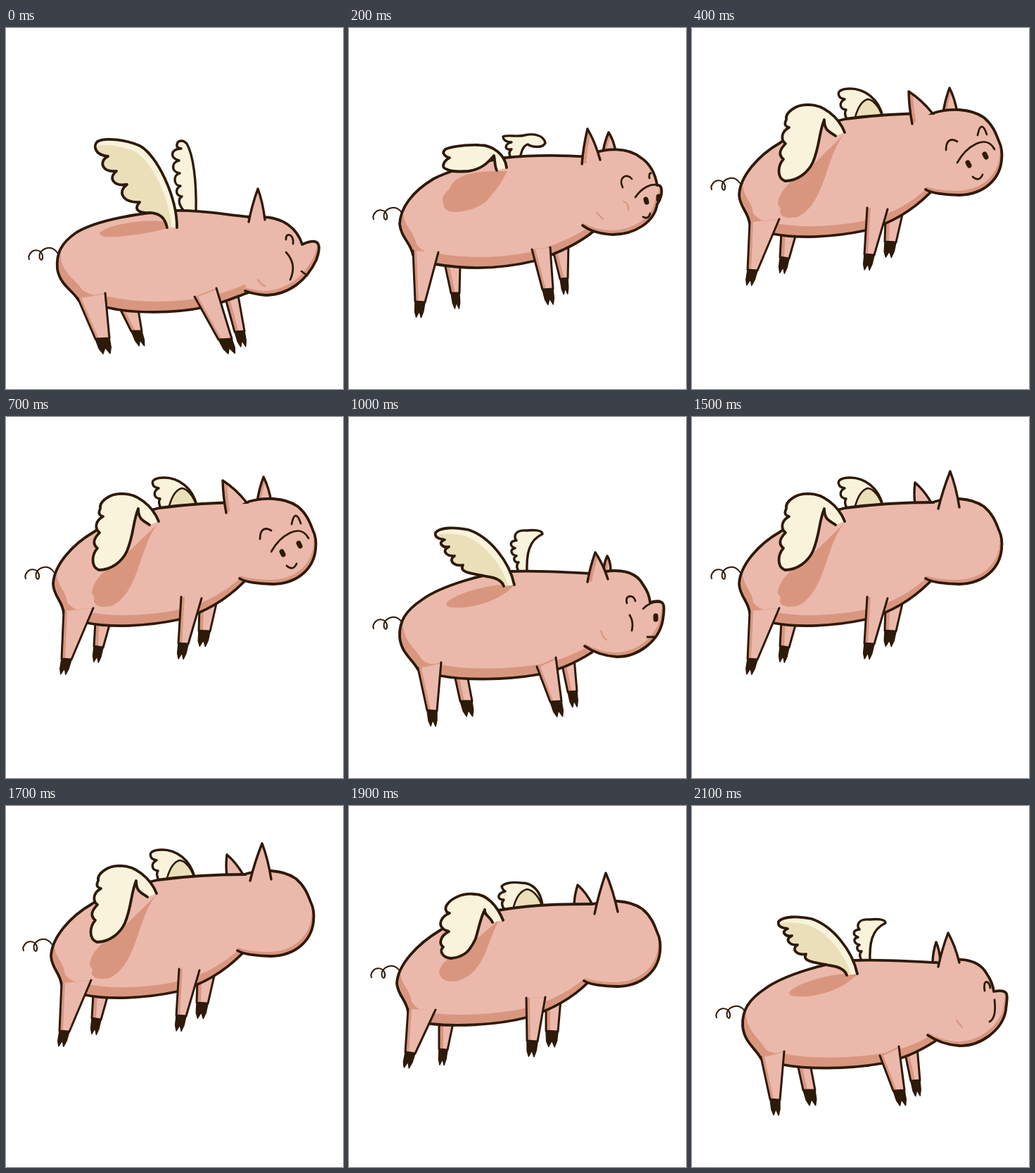
Animation of 479x512 px, one loop 2200 ms. Source, as an HTML page with a canvas:

```html
<!DOCTYPE html>
<html lang="en">
<head>
<meta charset="utf-8">
<title>Flying pig</title>
<style>
html, body { margin: 0; height: 100%; overflow: hidden; background: #fff; }
canvas { display: block; }
</style>
</head>
<body>
<canvas id="stage" width="479" height="512"></canvas>
<script>
const ctx = document.getElementById('stage').getContext('2d');
const INK = '#2e1a08', PINK = '#ebb9ab', ROSE = '#d9967f', CREAM = '#faf3db', TAN = '#ebdfba';

// Body poses from the lowest to the highest point of the flight.
// Legs: top left, bottom left, bottom right, top right.
const poses = [
  {
    head: [-2, 142], tail: [73, 319],
    body: 'M347 268C310 265 280 258 240 259C190 262 130 272 100 290C78 305 71 320 73 342C77 365 95 372 103 386C115 396 130 394 147 397C180 405 240 405 282 396C310 390 330 380 345 375L372 340',
    shadow: 'M134 289C150 278 200 270 224 275L230 284C210 290 160 298 140 296Q131 294 134 289',
    near: [[102, 383, 127, 441, 147, 440, 141, 376], [268, 381, 302, 442, 321, 441, 299, 369]],
    far: [[163, 400, 178, 430, 193, 430, 188, 400], [312, 384, 325, 431, 339, 430, 329, 374]],
    wing: 'M243 283C243 240 215 180 190 167C170 158 140 155 130 161C124 166 125 180 145 182C132 188 135 205 157 203C145 212 152 225 172 222C158 232 165 248 190 247C180 258 190 263 205 262C220 263 226 270 229 283',
    farWing: 'M270 262C271 215 266 180 257 164C250 157 242 160 243 168C245 171 248 171 249 171C234 172 232 184 246 188C235 190 234 204 247 206C237 208 238 224 248 224C240 228 241 238 250 239C243 243 246 252 255 262'
  },
  {
    head: [5, 103], tail: [75, 291],
    body: 'M348 222C310 221 280 217 228 219C190 222 130 240 104 259C80 275 71 290 72 312C74 335 90 343 98 358C107 368 118 364 130 367C160 373 220 374 270 365C295 360 320 350 345 334L375 300',
    shadow: 'M138 264C150 250 200 238 218 238L235 238C215 262 170 273 148 270Q138 270 138 264',
    near: [[98, 356, 111, 416, 125, 417, 131, 348], [267, 354, 286, 404, 302, 403, 294, 341]],
    far: [[150, 366, 158, 403, 175, 403, 168, 366], [303, 352, 311, 390, 324, 389, 320, 342]],
    wing: 'M235 238C228 205 200 170 170 160C150 156 130 156 123 164C121 172 130 173 136 174C125 178 133 186 142 184C130 190 140 198 150 197C140 204 150 212 162 210C155 222 180 222 195 226C210 228 218 233 220 240',
    farWing: 'M253 222C252 195 255 175 275 166C275 160 262 160 252 161C240 160 235 165 236 172L238 175C228 176 228 183 236 186C228 188 230 195 238 197C232 200 235 207 241 206C237 210 238 215 243 222'
  },
  {
    head: [0, 56], tail: [75, 262],
    body: 'M345 183C310 181 270 179 222 184C180 190 135 206 120 214C90 232 73 255 72 278C74 297 88 305 91 322C100 334 110 333 123 335C170 343 220 341 265 330C295 320 325 307 348 288L370 260',
    shadow: 'M134 248C130 240 138 232 143 228C148 212 170 203 208 203L225 203C215 225 200 240 195 246C182 256 170 259 152 261Q135 262 134 248',
    near: [[91, 316, 94, 388, 108, 389, 127, 318], [260, 314, 275, 371, 290, 370, 286, 311]],
    far: [[136, 334, 145, 376, 157, 376, 158, 334], [290, 316, 300, 356, 311, 355, 312, 304]],
    wing: 'M224 198C222 180 205 166 185 166C160 165 140 170 137 172C130 178 138 183 143 184C135 188 130 198 138 200C145 204 155 204 170 203C190 200 198 190 206 181C208 190 207 196 210 202',
    farWing: 'M243 184C246 172 248 167 254 165C262 170 276 170 279 163C277 152 262 149 250 152C240 155 225 151 219 154C219 160 226 162 231 162C221 164 220 174 231 172C226 176 228 180 230 184'
  },
  {
    head: [2, 19], tail: [72, 234],
    body: 'M348 139C310 139 270 139 218 147C180 153 145 165 130 176C98 195 69 225 68 252C70 270 82 275 84 292C92 306 105 307 117 309C150 313 210 311 252 300C285 290 315 275 340 250L372 220',
    shadow: 'M128 235C130 225 140 215 150 215L215 160C195 190 195 240 150 249Q130 250 128 235',
    near: [[84, 288, 80, 349, 94, 351, 123, 289], [252, 272, 253, 333, 268, 334, 279, 271]],
    far: [[128, 305, 128, 345, 140, 346, 149, 303], [280, 282, 280, 319, 297, 320, 301, 274]],
    wing: 'M219 162C210 140 195 125 178 125C160 123 145 132 140 139C135 145 138 152 143 152C130 157 128 168 132 172C136 178 140 176 142 178C130 184 127 195 134 200C128 205 132 215 145 216C165 214 172 205 180 188C185 172 187 158 193 147C192 155 200 156 204 165',
    farWing: 'M275 141C273 122 262 109 245 109C230 107 220 110 217 114C218 119 221 120 222 121C210 124 210 133 220 133C216 137 217 142 222 148',
    vane: 'M234 143C238 128 245 120 253 118C261 119 270 128 274 141'
  },
  {
    head: [0, 0], tail: [68, 220],
    body: 'M345 121C310 121 270 122 218 129C180 138 140 150 125 163C95 180 68 210 67 237C68 255 80 260 82 278C92 290 103 290 115 292C150 299 200 297 247 287C280 278 310 262 338 234L370 200',
    shadow: 'M122 250C122 235 140 215 150 215L217 150C190 180 190 250 150 268C130 272 122 265 126 256',
    near: [[82, 275, 79, 343, 93, 344, 124, 271], [249, 255, 245, 321, 259, 322, 278, 257]],
    far: [[127, 290, 125, 325, 138, 327, 149, 288], [275, 268, 274, 303, 290, 304, 301, 256]],
    wing: 'M217 148C208 125 185 108 165 109C148 108 132 120 134 130C130 138 134 140 138 141C125 148 127 160 133 164C125 172 122 180 130 186C122 195 120 212 132 217C150 217 165 205 172 190C182 165 180 150 188 130C188 146 196 147 204 153',
    farWing: 'M271 125C265 100 245 86 225 86C212 86 206 90 209 96C210 100 214 100 217 101C208 106 210 115 219 116C216 120 218 124 220 130',
    vane: 'M232 126C236 112 242 103 250 101C258 102 266 112 270 124'
  }
];

// Head views by turn: positive faces the viewer, negative looks away.
const round = 'M345 120C365 114 395 113 415 127C428 138 432 150 436 160C441 170 441 180 440 188C437 215 415 236 380 237C360 237 340 234 332 229';
const ear = (x1, y1, x, y, x2, y2) =>
  `M${x1} ${y1}Q${(x1 + x) / 2 - 2} ${(y1 + y) / 2} ${x} ${y}Q${(x + x2) / 2 + 2} ${(y + y2) / 2 - 3} ${x2} ${y2}`;
const view = (skull, near, far, face = '', nose = '', blush = '') =>
  ({ skull, near: ear(...near), far: ear(...far), face, nose, blush });

const views = {
  0: view('M347 127C362 125 385 124 403 137C414 145 420 155 423 165C450 153 450 168 443 187C430 215 405 236 372 237C360 236 350 234 342 231',
    [347, 133, 360, 86, 370, 130], [352, 130, 360, 115, 366, 130],
    'M400 158C399 147 412 150 410 164M400 176Q416 193 406 215M422 203L430 209', '', 'M360 215Q365 222 370 224'),
  1: view('M345 120C365 113 400 110 413 135C419 143 422 150 423 160C448 152 443 170 441 185C436 215 405 238 375 237C358 236 342 230 330 222',
    [334, 131, 345, 89, 363, 127], [357, 114, 362, 94, 367, 114],
    'M390 161C386 148 401 149 402 158M413 169Q425 157 439 160M394 178Q400 188 397 200M419 209L430 209',
    'M431 179L431 184', 'M353 200Q356 211 361 213'),
  2: view('M345 122C365 115 395 112 415 128C430 138 436 155 438 167C447 166 446 182 438 194C434 220 405 237 375 237C355 236 340 230 332 224',
    [331, 137, 339, 87, 357, 131], [361, 120, 369, 92, 379, 119],
    'M389 170C382 156 395 149 402 158M427 157C426 152 428 149 429 150M407 184C415 172 430 162 442 168M418 212Q426 216 428 207',
    'M422 187L423 191M440 183L440 187', 'M390 190Q398 192 397 203M352 206L361 215'),
  4: view(round, [313, 136, 308, 90, 341, 120], [357, 120, 366, 85, 377, 120],
    'M361 173C361 156 371 157 377 161M406 152C409 136 414 136 419 151M377 191C390 168 418 149 430 172M399 211Q408 219 413 208',
    'M392 191L394 195M416 179L418 183'),
  '-1': view('M345 120C365 112 400 110 414 135C420 144 423 152 424 160C450 155 442 170 441 187C436 215 405 238 375 237C358 236 342 230 330 222',
    [345, 125, 359, 77, 375, 119], [337, 118, 342, 90, 348, 118],
    'M411 159C408 142 418 144 419 155M425 172Q428 197 418 203', '', 'M371 201L379 211'),
  '-3': view(round, [347, 134, 363, 76, 380, 131], [318, 121, 323, 93, 344, 121]),
  '-4': view(round, [350, 130, 367, 77, 380, 128], [317, 124, 317, 93, 341, 123])
};

const NUM = /-?[\d.]+/g;
function halfway(a, b) {
  const ends = b.match(NUM) || [];
  let i = 0;
  return a.replace(NUM, n => ends.length ? (+n + +ends[i++]) / 2 : n);
}
const blend = (a, b) => Object.fromEntries(Object.keys(a).map(k => [k, halfway(a[k], b[k])]));
views[3] = blend(views[2], views[4]);
views[5] = views[4];
views[-2] = { ...blend(views[-1], views[-3]), face: '', blush: '' };
views[-5] = views[-4];

function line(path, width = 3.4, color = INK) {
  ctx.lineWidth = width;
  ctx.strokeStyle = color;
  ctx.stroke(new Path2D(path));
}

// Fills a shape, tints the rim left free by its shifted copy, then inks it.
function shape(d, fill, rim, dx = 0, dy = 0, width = 3.4) {
  const path = new Path2D(d);
  ctx.fillStyle = fill;
  ctx.fill(path);
  if (rim) {
    const rest = new Path2D();
    rest.rect(-100, -100, 700, 800);
    rest.addPath(path, { e: dx, f: dy });
    ctx.save();
    ctx.clip(path);
    ctx.fillStyle = rim;
    ctx.fill(rest, 'evenodd');
    ctx.restore();
  }
  if (width) line(path, width);
}

const toes = [[0, 0], [1, 0], [.95, .6], [.78, 1], [.53, .6], [.28, 1], [.08, .65]];
function leg([ax, ay, bx, by, cx, cy, dx, dy], rim) {
  shape(`M${ax} ${ay}L${bx} ${by}L${cx} ${cy}L${dx} ${dy}`, PINK, ROSE, rim, 0, 3);
  const vx = bx - ax + cx - dx, vy = by - ay + cy - dy, k = 22 / Math.hypot(vx, vy);
  const hoof = toes.map(([u, v]) => [bx + (cx - bx) * u + vx * k * v, by + (cy - by) * u + vy * k * v]);
  ctx.fillStyle = INK;
  const path = new Path2D(`M${hoof.join('L')}Z`);
  ctx.fill(path);
  line(path, 1.5);
}

function at([x, y], draw) {
  ctx.save();
  ctx.translate(x, y);
  draw();
  ctx.restore();
}

function pig(level, turn) {
  const pose = poses[Math.min(level, 4)], head = views[turn];
  const lifted = level < 2;

  at(pose.tail, () => line('M0 0c-8-12-21-7-25 1c-2 10 5 12 4 3c-2-9-12-10-17-4q-4 5-2 9', 2));
  pose.far.forEach(l => leg(l, 6));
  shape(pose.farWing, CREAM);
  if (pose.vane) shape(pose.vane, TAN, null, 0, 0, 2.6);
  at(pose.head, () => shape(head.far, PINK, turn > 0 && ROSE, 5, 0));

  shape(pose.body, PINK, ROSE, 5, -15, 3.8);
  shape(pose.shadow, ROSE, null, 0, 0, 0);
  pose.near.forEach(l => leg(l, 5));
  shape(pose.wing, lifted ? TAN : CREAM, lifted && CREAM, -7, 8, 3.8);

  at(pose.head, () => {
    shape(head.skull, PINK, ROSE, -3, -6, 3.8);
    shape(head.near, PINK, turn > 0 && ROSE, 6, 0);
    line(head.blush, 2.2, ROSE);
    line(head.face, 2.8);
    line(head.nose, 7);
  });
}

function frame(now) {
  const step = Math.floor(now / 100) % 22;
  const phase = step % 11, level = Math.min(phase, 11 - phase);
  ctx.fillStyle = '#fff';
  ctx.fillRect(0, 0, 479, 512);
  ctx.lineCap = ctx.lineJoin = 'round';
  at(level === 5 ? [-3, -24] : [0, 0], () => pig(level, step < 11 ? level : -level));
  requestAnimationFrame(t => frame(t - start));
}
const start = performance.now();
frame(0);
</script>
</body>
</html>
```
